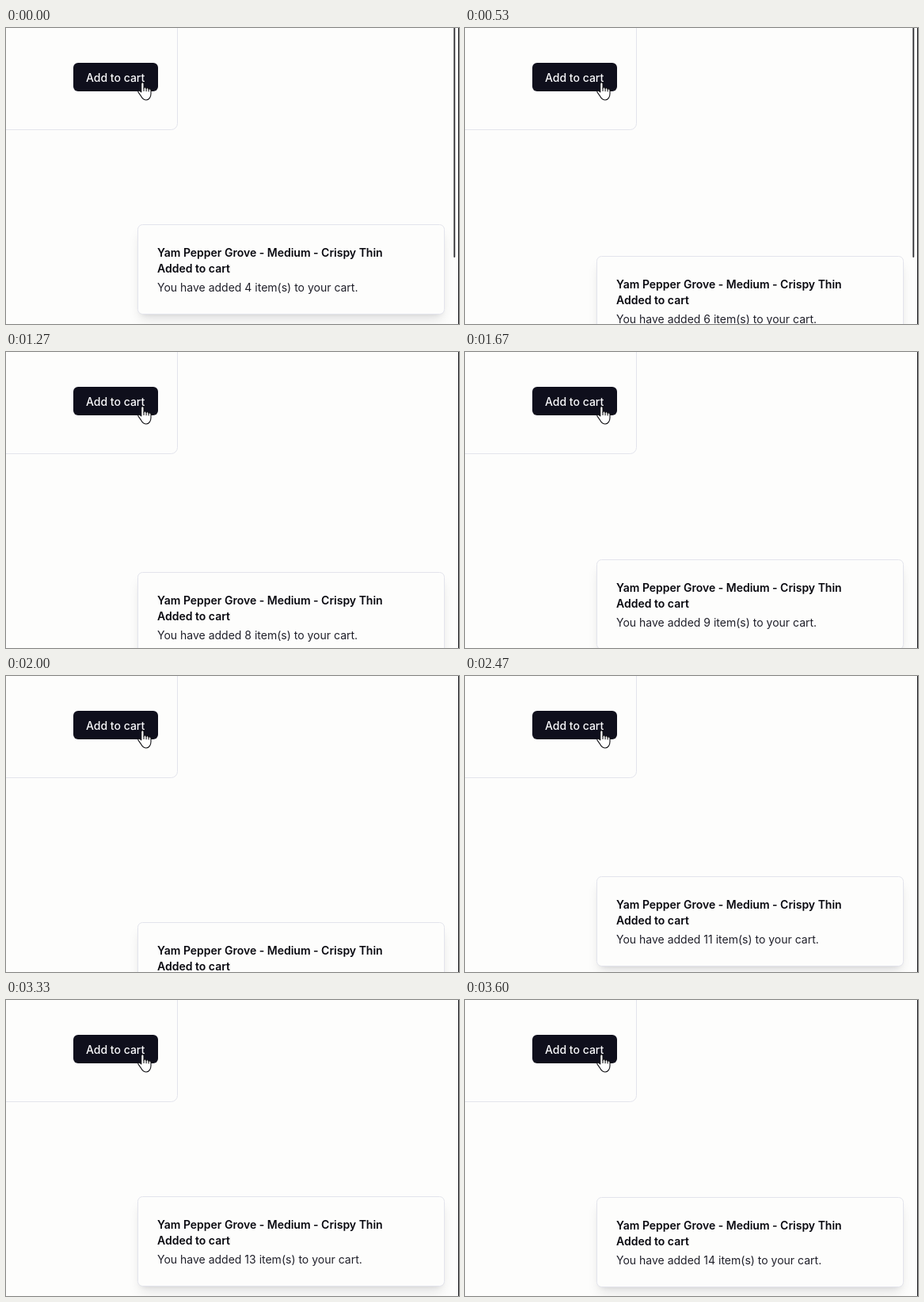
Animation, 572 px wide and 374 px high, one loop 3670 ms. Source, as an HTML page with a canvas:

```html
<!DOCTYPE html>
<html lang="en">
<head>
<meta charset="utf-8">
<title>Add to cart</title>
<style>
  html, body { margin: 0; width: 100%; height: 100%; overflow: hidden; background: #fdfdfc; }
  canvas { display: block; }
</style>
</head>
<body>
<canvas id="stage" width="572" height="374"></canvas>
<script>
const ctx = document.getElementById('stage').getContext('2d');
const LOOP = 3670;
const PAPER = '#fdfdfc', INK = '#08080f', BUTTON = '#0f0f1c', LINE = '#e3e4ec';
const ENTER = 150;
const FIRST_COUNT = 4;
// Each click replaces the toast with a new one, one item higher.
const clicks = [-270, 100, 473, 837, 1204, 1581, 1960, 2358, 2727, 3096, 3465];
const toast = { x: 166, y: 248, w: 388, h: 114 };

// CSS "ease": cubic-bezier(.25, .1, .25, 1)
function ease(x) {
  if (x >= 1) return 1;
  const bezier = (u, a, b) => 3 * u * (1 - u) ** 2 * a + 3 * u * u * (1 - u) * b + u ** 3;
  let lo = 0, hi = 1;
  for (let i = 0; i < 24; i++) {
    const mid = (lo + hi) / 2;
    if (bezier(mid, 0.25, 0.25) < x) lo = mid; else hi = mid;
  }
  return bezier(lo, 0.1, 1);
}

function box(x, y, w, h, r) {
  ctx.beginPath();
  ctx.roundRect(x, y, w, h, r);
}

function outlined(x, y, w, h, r) {
  box(x + 0.5, y + 0.5, w - 1, h - 1, r);
  ctx.fillStyle = PAPER;
  ctx.fill();
  ctx.strokeStyle = LINE;
  ctx.lineWidth = 1;
  ctx.stroke();
}

function shadow(x, y, w, h, dy, blur, spread) {
  ctx.save();
  ctx.shadowColor = 'rgba(0,0,24,.1)';
  ctx.shadowBlur = blur;
  ctx.shadowOffsetY = dy;
  ctx.fillStyle = PAPER;
  box(x - spread, y - spread, w + 2 * spread, h + 2 * spread, 5);
  ctx.fill();
  ctx.restore();
}

// Returns the x where the text ends.
function label(text, x, y, weight, color = INK, kerning = 'auto') {
  ctx.font = `${weight} 14px Inter, sans-serif`;
  ctx.fontKerning = kerning;
  ctx.fillStyle = color;
  ctx.fillText(text, x, y);
  return x + ctx.measureText(text).width;
}

function drawHand(x, y) {
  ctx.save();
  ctx.translate(x, y);
  ctx.lineJoin = ctx.lineCap = 'round';
  ctx.strokeStyle = '#101014';
  ctx.lineWidth = 1.1;
  ctx.fillStyle = '#fff';
  const hand = new Path2D(
    'M4.8 13V2.4Q4.9.8 6.4.8T8 2.4V8Q8.3 6.9 9.5 7T11.1 8.5' +
    'Q11.5 7.6 12.6 7.8T14.1 9.3Q14.6 8.6 15.7 9T17 10.6V15' +
    'C17 19.5 14.6 23 10.8 23C7.4 23 5.6 20.6 4.2 17.6L1.2 13.4' +
    'Q.2 11.8 1.5 11.2T4.8 13Z');
  ctx.fill(hand);
  ctx.stroke(hand);
  ctx.stroke(new Path2D('M8 8V11.5M11.1 8.5V11.7M14.1 9.3V12'));
  ctx.restore();
}

function drawToast(time) {
  const index = clicks.findLastIndex(start => start <= time);
  const shift = Math.round(toast.h * (1 - ease((time - clicks[index]) / ENTER)));
  const { x, w, h } = toast, y = toast.y + shift, left = x + 25;
  shadow(x, y, w, h, 10, 15, -3);
  shadow(x, y, w, h, 4, 6, -4);
  outlined(x, y, w, h, 6);
  label('Yam Pepper Grove - Medium - Crispy Thin', left, y + 41, 600);
  label('Added to cart', left, y + 61, 600);

  const note = (text, at, kerning) => label(text, at, y + 85, 400, '#20202a', kerning);
  const countX = note('You have added ', left);
  const restX = note(String(FIRST_COUNT + index), countX, 'none');
  note(' item(s) to your cart.', restX);
}

function draw(time) {
  ctx.fillStyle = PAPER;
  ctx.fillRect(0, 0, 572, 374);

  outlined(-20, -20, 237, 149, 8);
  box(85, 44, 107, 36, 6);
  ctx.fillStyle = BUTTON;
  ctx.fill();
  label('Add to cart', 101, 68, 500, '#fafafc');

  drawToast(time);

  ctx.globalAlpha = Math.max(0, Math.min(1, (850 - time) / 250));
  box(565.3, -4, 1.9, 294, 1);
  ctx.fillStyle = '#38383c';
  ctx.fill();
  ctx.globalAlpha = 1;

  ctx.fillStyle = '#121216';
  ctx.fillRect(571, 0, 1, 374);
  drawHand(166, 68);
}

function recordedTime(ms) {
  const step = Math.floor((Math.floor(ms / 10) + 0.5) * 0.15);
  return Math.round(step * 20 / 3) * 10;
}

const begin = performance.now();
function tick() {
  draw(recordedTime((performance.now() - begin) % LOOP));
  requestAnimationFrame(tick);
}
tick();
</script>
</body>
</html>
```
